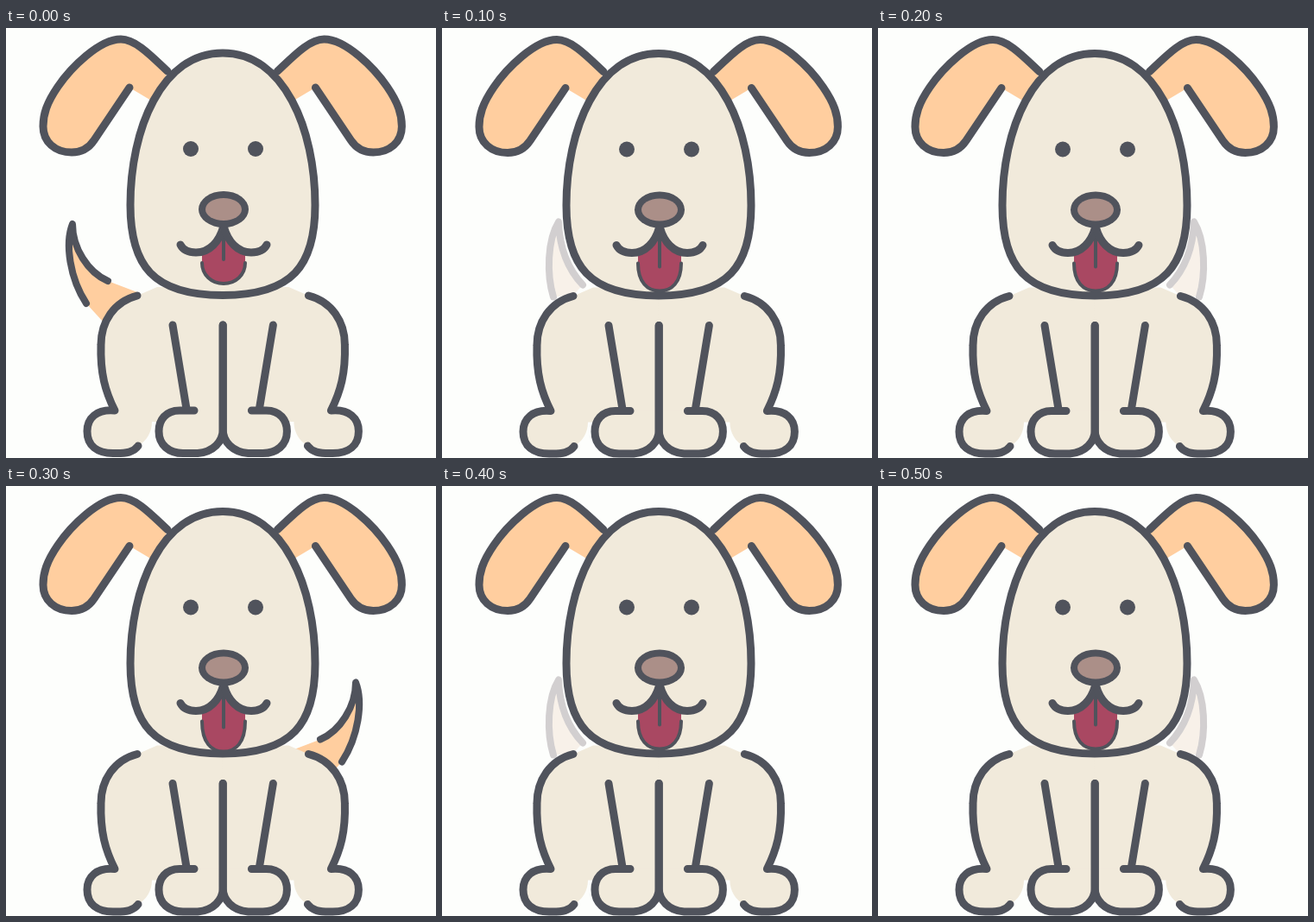
These frames come from a looping animation (498x498 px, 0.6 s). An HTML page with a canvas:

```html
<!DOCTYPE html>
<html lang="en">
<head>
<meta charset="utf-8">
<title>Dog wagging its tail</title>
<style>
html, body { margin: 0; width: 100%; height: 100%; overflow: hidden; background: #fdfefc; }
canvas { display: block; }
</style>
</head>
<body>
<canvas id="stage" width="498" height="498"></canvas>
<script>
const ctx = document.getElementById('stage').getContext('2d');
const INK = '#50535c', CREAM = '#f1eadb', PEACH = '#ffce9f';
const STEP = 100;
const AXIS = 251.2;

const TAIL = {
  fill: 'M77 227C68 250 74 290 93 319L114 342L152 306L118 293C95 283 77 255 77 227Z',
  line: 'M93 319C74 290 68 250 77 227C77 255 95 283 118 293'
};
const GHOST = {
  fill: 'M135 224C122 245 121 285 129 311L152 309L163 297C143 276 136 250 135 224Z',
  line: 'M129 311C121 285 122 245 135 224C136 250 143 276 163 297'
};
const EAR = 'M187 50C168 32 150 13 133 13C108 13 75 46 60 68C47 87 43 100 43 114' +
  'C43 132 57 144 76 144C88 144 96 139 102 130L143 69';
const HEAD = 'M251 29C180 29 144 117 144 205C144 275 170 309.5 251 309.5' +
  'C332 309.5 358 275 358 205C358 117 322 29 251 29Z';
const FLANK = 'M152 310C125 317 110 340 110 367C109 400 115 421 126 443' +
  'C105 441 94 452 94 467C94 484 106 492.5 124 492.5C140 493 148 491 153 484';
const LEG = 'M193 344L209 441M218 443L201 443C185 443 177 454 177 467' +
  'C177 483 189 492.5 205 492.5L222 492.5C240 491 251.2 479 251.2 465L251.2 344';
const PAW = 'M252 443L201 443C185 443 177 454 177 467' +
  'C177 483 189 492 205 492L222 492C240 491 252 479 252 465Z';
const SMILE = 'M251.5 231C247 247 236 260 220 260C211 260 205 257 202 251';

// One pose per step: tail shape, mirror axis (0 = unmirrored), tongue tip
const POSES = [
  { tail: TAIL, axis: 0, tip: 296 },
  { tail: GHOST, axis: 0, tip: 304 },
  { tail: GHOST, axis: 250.5, tip: 304 },
  { tail: TAIL, axis: 241, tip: 307 },
  { tail: GHOST, axis: 0, tip: 304 },
  { tail: GHOST, axis: 250.5, tip: 304 }
];

function fill(d, color) {
  ctx.fillStyle = color;
  ctx.fill(new Path2D(d));
}

function stroke(d, color = INK, width = 9) {
  ctx.strokeStyle = color;
  ctx.lineWidth = width;
  ctx.stroke(new Path2D(d));
}

function mirrored(axis, draw) {
  ctx.save();
  ctx.translate(2 * axis, 0);
  ctx.scale(-1, 1);
  draw();
  ctx.restore();
}

function both(draw, axis = AXIS) {
  draw();
  mirrored(axis, draw);
}

function ellipse(x, y, rx, ry, color) {
  ctx.beginPath();
  ctx.ellipse(x, y, rx, ry, 0, 0, Math.PI * 2);
  ctx.fillStyle = color;
  ctx.fill();
}

function drawTail({ tail, axis }) {
  const faded = tail === GHOST;
  const draw = () => {
    fill(tail.fill, faded ? '#f8f1e9' : PEACH);
    stroke(tail.line, faded ? '#d2cfd0' : INK, 8);
  };
  if (axis) mirrored(axis, draw);
  else draw();
}

function drawBody() {
  both(() => {
    fill(FLANK + 'C163 478 169 468 169 456L252 456L252 300L175 300Z', CREAM);
    fill(PAW, CREAM);
  });
  both(() => {
    stroke(FLANK);
    stroke(LEG);
  });
}

function drawMouth(tip) {
  const cup = `C227 ${tip - 10} 238 ${tip} 252 ${tip}C266 ${tip} 277 ${tip - 10} 277 272`;
  fill(`M252 231C248 247 240 256 227 260L227 272${cup}L277 260C264 256 256 247 252 231Z`, '#a94862');
  stroke(`M227 272${cup}`, INK, 4);
  stroke(`M252 232L252 ${tip - 28}`, INK, 4);
  both(() => stroke(SMILE), 252);
}

function drawHead(tip) {
  both(() => {
    fill(EAR + 'L175 88Z', PEACH);
    stroke(EAR);
  }, 250.7);
  fill(HEAD, CREAM);
  stroke(HEAD);
  ellipse(214, 140, 9, 9, INK);
  ellipse(289, 140, 9, 9, INK);
  drawMouth(tip);
  ellipse(252, 210, 29, 21, INK);
  ellipse(252, 210, 21, 13, '#ab8f88');
}

function render(now) {
  const index = Math.floor(now / STEP) % POSES.length;
  const pose = POSES[index];
  ctx.setTransform(1, 0, 0, 1, 0, 0);
  ctx.fillStyle = '#fdfefc';
  ctx.fillRect(0, 0, 498, 498);
  ctx.translate(0, index ? 0.5 : 0);
  ctx.lineCap = ctx.lineJoin = 'round';
  drawTail(pose);
  drawBody();
  drawHead(pose.tip);
}

let start;
function tick(now) {
  start ??= now;
  render(now - start);
  requestAnimationFrame(tick);
}
render(0);
requestAnimationFrame(tick);
</script>
</body>
</html>
```
